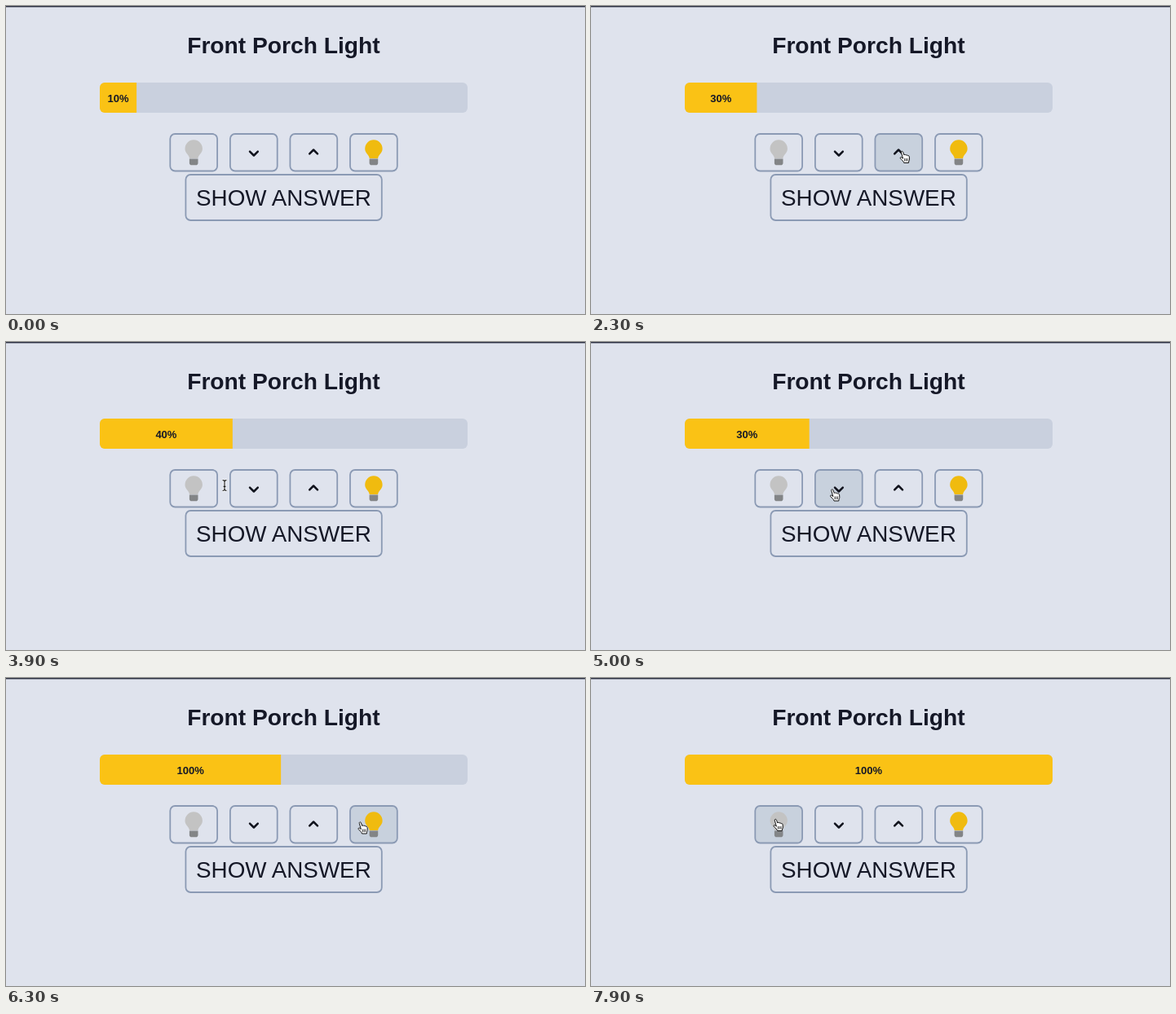
These frames come from a looping animation (710x378 px, 8 s). An HTML page:

```html
<!DOCTYPE html>
<html lang="en">
<head>
<meta charset="utf-8">
<title>Front Porch Light</title>
<style>
  html, body { margin: 0; width: 100%; height: 100%; overflow: hidden; background: #dfe3ed; }
  svg { display: block; width: 710px; height: 378px; }
  text { font-family: "Liberation Sans", Arial, sans-serif; fill: #151827; text-anchor: middle; }
  .title { font-size: 28.2px; font-weight: 700; }
  .label { font-size: 13px; font-weight: 700; }
  .answer { font-size: 27.8px; }
  .btn { fill: transparent; stroke: #8b9ab4; stroke-width: 1.8; }
  .btn.hover { fill: #c8d1dd; }
  .chevron { fill: none; stroke: #10121c; stroke-width: 2.5; stroke-linecap: round; stroke-linejoin: round; }
  .off { fill: #c3c3c3; }
  .on { fill: #f0bb0f; }
</style>
</head>
<body>
<svg viewBox="0 0 710 378">
  <defs>
    <clipPath id="track"><rect x="115" y="94" width="451" height="37" rx="6"/></clipPath>
    <g id="bulb">
      <path d="M-10.7-4.8A10.7 10.9 0 0 1 10.7-4.8C10.7 1 5.6 2.2 5.2 7H-5.2C-5.6 2.2-10.7 1-10.7-4.8Z"/>
      <path d="M-5.3 7.6H5.3V12.4Q5.3 15.2 2.5 15.2H-2.5Q-5.3 15.2-5.3 12.4Z" fill="#838587"/>
    </g>
  </defs>
  <rect width="710" height="378" fill="#dfe3ed"/>
  <rect width="710" height="1.4" fill="#2b2f40"/>
  <text class="title" x="340.4" y="58.4">Front Porch Light</text>

  <g clip-path="url(#track)">
    <rect x="115" y="94" width="451" height="37" fill="#c9d0de"/>
    <rect id="fill" x="115" y="94" width="45.1" height="37" fill="#fac215"/>
  </g>
  <text id="label" class="label" x="137.5" y="117.5">10%</text>

  <g id="buttons"></g>
  <use href="#bulb" class="off" transform="translate(230.2 180)"/>
  <path class="chevron" d="M299 178.6l4.9 4.9 4.9-4.9"/>
  <path class="chevron" d="M372.2 181.4l4.9-4.9 4.9 4.9"/>
  <use href="#bulb" class="on" transform="translate(450.9 180)"/>

  <rect class="btn" x="220.4" y="207" width="240.4" height="56" rx="6"/>
  <text class="answer" x="340.4" y="245.2">SHOW ANSWER</text>

  <g id="cursor" visibility="hidden">
    <g id="hand" stroke="#111" stroke-linecap="round" stroke-linejoin="round">
      <path fill="#fff" d="M1.7 1.8C1.1.2 3.3-.3 3.9 1.2L5.3 5C5.6 4 7.2 4.1 7.5 5.2 8 4.4 9.4 4.7 9.6 5.8 10.4 5.2 11.5 5.7 11.6 6.9L11.8 10C11.8 11.7 10.8 12.2 10.8 14.5H5C4.8 12.8 2.6 11.2.7 9 .1 8 1.2 7 2.3 7.8L3.6 8.9Z"/>
      <path fill="none" stroke-width=".8" d="M5.9 9.4v2.8M7.7 9.4v2.8M9.5 9.4v2.8"/>
    </g>
    <g id="beam" fill="none">
      <path id="stem" d="M.6.6Q3 .6 3 2.4Q3 .6 5.4.6M3 2.4V11.6M.6 13.4Q3 13.4 3 11.6Q3 13.4 5.4 13.4M1.6 8.4H4.4" stroke="#fff" stroke-width="2.4"/>
      <use href="#stem"/>
      <path d="M.6.6Q3 .6 3 2.4Q3 .6 5.4.6M3 2.4V11.6M.6 13.4Q3 13.4 3 11.6Q3 13.4 5.4 13.4M1.6 8.4H4.4" stroke="#111" stroke-width="1.1"/>
    </g>
  </g>
</svg>
<script>
const LOOP = 8000, STEP = 100, SLIDE = 2000;
const BAR_X = 115, BAR_W = 451;
const BTN_X = [201.3, 274.9, 348.4, 422], BTN_W = 57.8;
const $ = id => document.getElementById(id);
const show = (el, on) => el.setAttribute('visibility', on ? 'visible' : 'hidden');

// time of each click and the brightness it sets
const clicks = [[990, 20], [2100, 30], [3100, 40], [4350, 30], [5920, 100]];

// cursor path: time, x, y
const path = [
  [500, 391, 183], [900, 378.7, 178], [3400, 378.7, 178], [3800, 265, 169],
  [4050, 265, 169], [4250, 293, 180.5], [5150, 293, 180.5], [5550, 431.5, 176.5],
  [6800, 431.5, 176.5], [7500, 223.5, 173]
];

const buttons = BTN_X.map(x => {
  const r = document.createElementNS('http://www.w3.org/2000/svg', 'rect');
  const attrs = { class: 'btn', x, y: 157, width: BTN_W, height: 45.5, rx: 6 };
  for (const k in attrs) r.setAttribute(k, attrs[k]);
  return $('buttons').appendChild(r);
});

// cubic-bezier(.25, .1, .25, 1)
function ease(x) {
  if (x <= 0) return 0;
  if (x >= 1) return 1;
  const curve = (a, b, s) => 3 * a * s * (1 - s) ** 2 + 3 * b * s * s * (1 - s) + s ** 3;
  let lo = 0, hi = 1;
  for (let i = 0; i < 24; i++) {
    const mid = (lo + hi) / 2;
    if (curve(.25, .25, mid) < x) lo = mid; else hi = mid;
  }
  return curve(.1, 1, lo);
}

// every click starts a new slide from wherever the bar is
function brightness(t) {
  let from = 10, to = 10, start = 0;
  const at = time => from + (to - from) * ease((time - start) / SLIDE);
  for (const [time, level] of clicks) {
    if (time > t) break;
    from = at(time);
    to = level;
    start = time;
  }
  return { value: at(t), target: to };
}

function cursorAt(t) {
  if (t < path[0][0]) return null;
  const i = path.findIndex(p => p[0] > t);
  if (i < 0) return path[path.length - 1].slice(1);
  const [t0, x0, y0] = path[i - 1], [t1, x1, y1] = path[i];
  const k = (t - t0) / (t1 - t0), s = k * k * (3 - 2 * k);
  return [x0 + (x1 - x0) * s, y0 + (y1 - y0) * s];
}

function draw(t) {
  const { value, target } = brightness(t);
  const width = BAR_W * value / 100;
  $('fill').setAttribute('width', width);
  $('label').setAttribute('x', BAR_X + width / 2);
  $('label').textContent = target + '%';

  const pos = cursorAt(t);
  const tip = pos ? pos[0] + 3 : -1;
  const over = BTN_X.findIndex(x => tip >= x && tip <= x + BTN_W);
  buttons.forEach((b, i) => b.classList.toggle('hover', i === over));
  show($('cursor'), pos);
  show($('hand'), pos && over >= 0);
  show($('beam'), pos && over < 0);
  if (pos) $('cursor').setAttribute('transform', `translate(${pos})`);
}

const begin = performance.now();
function tick() {
  const t = (performance.now() - begin) % LOOP;
  draw(Math.floor(t / STEP) * STEP);
  requestAnimationFrame(tick);
}
tick();
</script>
</body>
</html>
```
